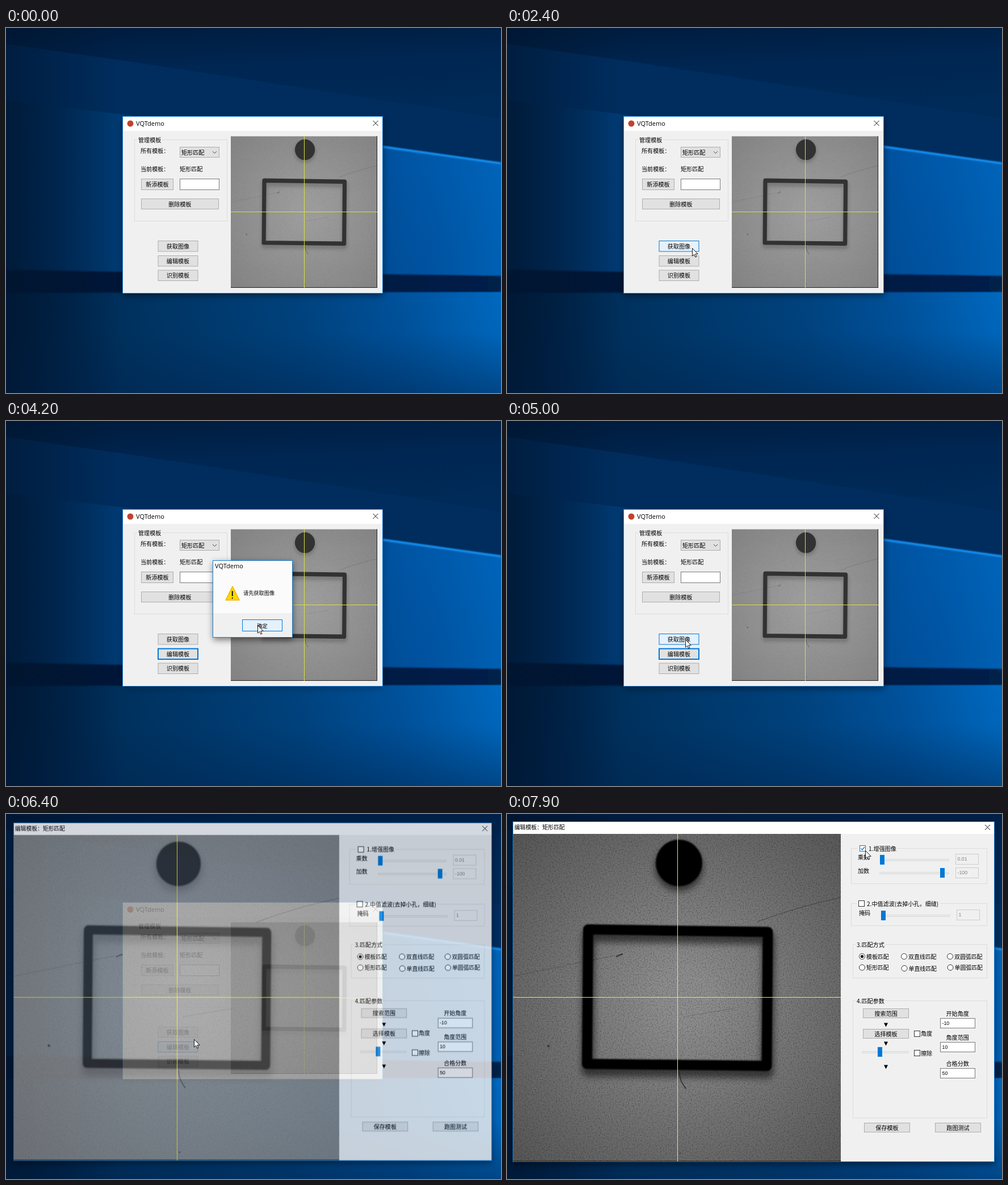
Recreate the animation shown at these times as an HTML page. Size 872 by 642 pixels, loop 8 s.

```html
<!DOCTYPE html>
<html lang="zh-CN">
<head>
<meta charset="utf-8">
<style>
html, body { margin: 0; width: 100%; height: 100%; overflow: hidden; background: #002a57; }
svg { display: block; width: 872px; height: 642px; }
text { font: 10.1px "Noto Sans CJK SC", "Noto Sans CJK", "Noto Sans", sans-serif; fill: #000; }
.latin { font: 11px "Open Sans", sans-serif; }
.num { font: 8.8px "Liberation Sans", sans-serif; }
.off { fill: #838383; }
.mid { text-anchor: middle; }
.btn rect { fill: #e1e1e1; stroke: #adadad; }
.btn.focus rect { stroke: #0078d7; stroke-width: 2; }
.btn.hover rect { fill: #e5f1fb; stroke: #0078d7; }
.btn.press rect { fill: #cce4f7; stroke: #005499; }
.group { fill: none; stroke: #dcdcdc; }
.edit { fill: #fff; stroke: #7a7a7a; }
.edit.dim { fill: #f0f0f0; stroke: #ccc; }
.box { fill: #fff; stroke: #333; }
.box.hover { stroke: #0078d7; }
.line { fill: none; stroke: #111; }
.cross { fill: none; stroke: #f0f01e; shape-rendering: crispEdges; }
</style>
</head>
<body>
<svg id="stage" viewBox="0 0 872 642"></svg>
<script>
const LOOP = 8000, STEP = 100;
const APP = 'VQTdemo';

const rect = (x, y, w, h, attrs = '') => `<rect x="${x}" y="${y}" width="${w}" height="${h}" ${attrs}/>`;
const text = (x, y, s, cls = '', attrs = '') => `<text x="${x}" y="${y}" class="${cls}" ${attrs}>${s}</text>`;
const path = (d, attrs) => `<path d="${d}" ${attrs}/>`;
const poly = (points, fill, attrs = '') => `<polygon points="${points}" fill="${fill}" ${attrs}/>`;

function gradient(id, x2, y2, ...stops) {
  const list = stops.map(([at, color, alpha = 1]) =>
    `<stop offset="${at}" stop-color="${color}" stop-opacity="${alpha}"/>`).join('');
  return `<linearGradient id="${id}" x1="0" y1="0" x2="${x2}" y2="${y2}">${list}</linearGradient>`;
}

function radial(id, inner, outer) {
  return `<radialGradient id="${id}" cx=".52" cy=".5" r=".75"><stop offset=".1" stop-color="${inner}"/>` +
    `<stop offset="1" stop-color="${outer}"/></radialGradient>`;
}

const blur = (id, size) => `<filter id="${id}" x="-30%" y="-30%" width="160%" height="160%">` +
  `<feGaussianBlur stdDeviation="${size}"/></filter>`;

const grain = (id, gain) => `<filter id="${id}" x="0" y="0" width="1" height="1">
  <feTurbulence type="fractalNoise" baseFrequency=".45" numOctaves="2" seed="4"/>
  <feColorMatrix values="0 0 0 0 0  0 0 0 0 0  0 0 0 0 0  ${gain} 0 0 0 ${-gain * .45}"/></filter>`;

const defs = `<defs>
  ${gradient('sky', 1, 0, [0, '#00203f'], [.45, '#00305f'], [1, '#003d7c'])}
  ${gradient('top', .25, 1, [0, '#001b3c'], [.5, '#002652'], [1, '#002a58'])}
  ${gradient('haze', 1, 0, [0, '#00264f'], [.22, '#003a72'], [1, '#00427f'])}
  ${gradient('beam', .25, 1, [0, '#0077d6'], [.18, '#005cae'], [1, '#00539f'])}
  ${gradient('beamSide', 1, 0, [0, '#00356e', .75], [.6, '#0052a2', .3], [1, '#0078d8', .35])}
  ${gradient('band', 1, 0, [0, '#001733'], [1, '#002049'])}
  ${gradient('floor', 1, 0, [0, '#001f42'], [.25, '#00325f'], [.6, '#00437f'], [.8, '#00529c'], [1, '#0069c0'])}
  ${gradient('floorFade', 0, 1, [0, '#00244e', 0], [.4, '#00244e', .05], [1, '#00244e', .5])}
  ${gradient('leftFade', 1, 0, [0, '#00152f', .65], [1, '#00152f', 0])}
  ${radial('plain', '#9e9e9e', '#838383')}
  ${radial('strong', '#8e8e8e', '#545454')}
  ${blur('soft', 1)}${blur('shade', 6)}${blur('drop', 6)}
  ${grain('fine', 1.1)}${grain('rough', 2.2)}
</defs>`;

const wallpaper =
  rect(0, 0, 872, 642, 'fill="url(#sky)"') +
  poly('0,0 872,0 872,160 390,85 225,60 0,28', 'url(#top)') +
  poly('0,28 225,60 390,85 872,160 872,440 0,440', '#002d5e') +
  poly('0,127 205,152 664,208 872,238 872,440 0,440', 'url(#haze)') +
  poly('560,190 664,207 872,237 872,440 560,440', 'url(#beam)') +
  poly('560,190 664,207 872,237 872,440 560,440', 'url(#beamSide)') +
  path('M664 209L872 238', 'stroke="#1c9bff" stroke-width="4" opacity=".75" filter="url(#soft)"') +
  rect(0, 464, 872, 178, 'fill="url(#floor)"') +
  rect(0, 464, 872, 178, 'fill="url(#floorFade)"') +
  poly('0,425 206,429 664,433 872,436 872,464 0,466', 'url(#band)', 'filter="url(#soft)"') +
  rect(0, 0, 200, 642, 'fill="url(#leftFade)"');

// Camera picture, drawn in the coordinates of the editor window.
function camera(enhanced) {
  const ink = enhanced ? '#000' : '#323232', fade = enhanced ? .55 : .25;
  const frame = attrs => path('M143 203L459.500 207.500 457.500 443 141 439.500Z',
    `fill="none" stroke="${ink}" stroke-linejoin="round" ${attrs}`);
  const scratch = (d, o, w = 1.2) => path(d, `fill="none" stroke="#222" stroke-width="${w}" opacity="${enhanced ? o * 1.7 : o}"`);
  return rect(11, 35, 577, 576, `fill="url(#${enhanced ? 'strong' : 'plain'})"`) +
    `<g filter="url(#shade)" opacity="${fade}">${frame('stroke-width="22" transform="translate(1 11)"')}
      <circle cx="303" cy="94" r="42" fill="${ink}"/></g>` +
    scratch('M440 190Q510 163 588 147', .28) + scratch('M11 285L190 249', .16) +
    scratch('M310 357L400 342', .14) + scratch('M192 251L204 246', .4, 2.5) +
    scratch('M303 452Q304 469 315 483', .5, 1.6) +
    `<g fill="#222" opacity=".5"><circle cx="73" cy="408" r="2.500"/><circle cx="305" cy="597" r="1.500"/></g>` +
    rect(11, 35, 577, 576, `filter="url(#${enhanced ? 'rough' : 'fine'})" opacity="${enhanced ? .32 : .2}"`) +
    `<g filter="url(#soft)">${frame(`stroke-width="${enhanced ? 18 : 16}"`)}
      <circle cx="303" cy="86" r="${enhanced ? 41 : 39.5}" fill="${ink}"/></g>`;
}

function button(id, x, y, w, h, label, attrs = '') {
  return `<g class="btn" id="${id}">${rect(x, y, w, h)}${text(x + w / 2, y + h / 2 + 4, label, 'mid', attrs)}</g>`;
}

function group(x, y, w, h, label, labelX, gapX, gapW) {
  return rect(x, y, w, h, 'class="group"') + rect(gapX, y - 6, gapW, 12, 'fill="#f0f0f0"') +
    text(labelX, y + 4.2, label);
}

const edit = (x, y, w, h, value = '', dim = false) =>
  rect(x, y, w, h, `class="edit${dim ? ' dim' : ''}"`) + text(x + 3, y + h / 2 + 2.6, value, dim ? 'num off' : 'num');

const check = (x, y, id = '') => rect(x, y, 10, 10, `class="box" id="${id}"`);

const radio = (x, y, label, on) => `<circle cx="${x}" cy="${y}" r="5" class="box"/>` +
  (on ? `<circle cx="${x}" cy="${y}" r="2.600"/>` : '') + text(x + 7.500, y + 4, label, '', 'style="font-size:9.900px"');

const slider = (x, y, w, thumb) => rect(x, y - 1.5, w, 3, 'fill="#e7eaea" stroke="#d6d6d6" stroke-width=".8"') +
  rect(thumb, y - 9, 8, 17, 'fill="#0078d7"');

const arrow = y => poly(`664,${y - 3} 671,${y - 3} 667.5,${y + 4}`, '#000');

const closeMark = (x, y) => path(`M${x - 4.5} ${y - 4.5}l9 9m0-9l-9 9`, 'class="line"');

const shadow = (x, y, w, h, id) => rect(x, y + 4, w, h, `fill="#000" opacity=".5" filter="url(#drop)" id="${id}"`);

const mainWindow = shadow(206, 156, 458, 310, 'mainShadow') +
  rect(205.5, 155.5, 458, 311, 'fill="#f0f0f0" stroke="#1883d7"') +
  rect(206, 156, 457, 25, 'fill="#fff"') +
  '<circle cx="219" cy="168" r="5.500" fill="#c0432f"/>' +
  text(229, 172, APP, 'latin') + closeMark(651, 167.5) +
  group(226.5, 196.5, 163, 143, '管理模板', 233, 231, 44) +
  text(237, 220, '所有模板：') +
  rect(306.5, 209.5, 69, 18, 'fill="#e1e1e1" stroke="#adadad"') + text(309, 222.5, '矩形匹配') +
  path('M364 217l3.500 3.500 3.500-3.500', 'class="line" style="stroke:#444"') +
  text(237, 251.5, '当前模板：') + text(306, 251.5, '矩形匹配') +
  button('add', 238.5, 265.5, 56, 19, '新添模板') + edit(306.5, 265.5, 69, 19) +
  button('remove', 238.5, 300.5, 136, 18, '删除模板') +
  button('grab', 268, 374.5, 70, 18.5, '获取图像') +
  button('modify', 268, 400.5, 70, 18.5, '编辑模板') +
  button('detect', 268, 426, 70, 18.5, '识别模板') +
  `<g transform="translate(396 190.500) scale(.4472 .4627) translate(-11 -35)">${camera(false)}</g>` +
  path('M396 456.500H654M653.500 190V457', 'stroke="#222" fill="none"') +
  path('M525.500 190V457M396 323.500H654', 'class="cross" style="stroke:#dce03c"');

const alertBox = `<g id="alert">${shadow(365, 245, 140, 136, 'alertShadow')}
  ${rect(364.5, 245.5, 140, 135, 'fill="#fbfbfb" stroke="#1883d7"')}
  ${rect(365, 338, 139, 42, 'fill="#f0f0f0"')}
  ${text(368, 259, APP, 'latin')}
  ${path('M399 291L411 315H387Z', 'fill="#ffd800" stroke="#f0b400" stroke-linejoin="round" stroke-width="1.500"')}
  ${path('M398.800 299V308M398.800 310.500V312.500', 'stroke="#111" stroke-width="2"')}
  ${text(418, 305.5, '请先获取图像', '', 'style="font-size:9.200px"')}
  ${button('ok', 416.5, 349.5, 70, 20, '确定', 'style="font-size:9.200px"')}</g>`;

const editor = `<g id="editor">${shadow(10, 13, 849, 599, 'editorShadow')}
  ${rect(10.5, 13.5, 848, 598, 'fill="#f0f0f0" stroke="#1883d7"')}
  ${rect(11, 14, 847, 21, 'fill="#fff"')}
  ${text(13, 27, '编辑模板：矩形匹配', '', 'style="font-size:9.850px"')}${closeMark(846.5, 23.5)}
  <g id="plainView">${camera(false)}</g><g id="strongView">${camera(true)}</g>
  ${path('M11 610.500H588', 'stroke="#222"')}
  ${path('M300.500 35V611M11 322.500H588', 'class="cross"')}
  ${group(606.5, 60.5, 239, 62, '1.增强图像', 637, 618, 69)}${check(621.5, 55.5, 'enhance')}
  <path id="tick" d="M623.500 60.500l2.300 2.500 4.200-5" class="line" style="stroke:#0078d7;stroke-width:1.300"/>
  ${text(618, 80, '乘数')}${slider(657, 81, 121, 657)}${edit(790.5, 70.5, 40, 18, '0.01', true)}
  ${text(618, 103.5, '加数')}${slider(657, 104, 121, 763)}${edit(790.5, 94.5, 40, 18, '-100', true)}
  ${group(606.5, 157.5, 239, 39, '2.中值滤波(去掉小孔，细缝)', 634, 616, 147)}${check(619.5, 152.5)}
  ${text(620, 178, '掩码')}${slider(659, 179, 121, 659)}${edit(792.5, 168.5, 40, 18, '1', true)}
  ${group(609.5, 229.5, 236, 59, '3.匹配方式', 616, 614, 51)}
  ${radio(625.5, 250.5, '模板匹配', true)}${radio(699.5, 250.5, '双直线匹配')}${radio(780.5, 250.5, '双圆弧匹配')}
  ${radio(625.5, 270, '矩形匹配')}${radio(700, 271.5, '单直线匹配')}${radio(781, 270, '单圆弧匹配')}
  ${group(609.5, 328.5, 236, 206, '4.匹配参数', 616, 614, 51)}
  ${button('area', 627.5, 342.5, 80, 16, '搜索范围')}${arrow(370.5)}
  ${button('pick', 627.5, 378.5, 80, 16, '选择模板')}${arrow(403.5)}
  ${slider(626, 419, 81, 653)}${arrow(444.5)}
  ${check(717.5, 381.5)}${text(729, 390, '角度')}${check(717.5, 415.5)}${text(729, 424.5, '擦除')}
  ${text(773.5, 354.5, '开始角度')}${edit(763.5, 359.5, 61, 17, '-10')}
  ${text(773.5, 397, '角度范围')}${edit(763.5, 401.5, 61, 17, '10')}
  ${text(773.5, 443, '合格分数')}${edit(763.5, 447.5, 61, 17, '50')}
  ${button('save', 629.5, 543.5, 80, 16, '保存模板')}${button('test', 754.5, 543.5, 80, 16, '跑图测试')}</g>`;

const pointer = `<path id="pointer" d="M0 0V13.600L3.200 10.700 5.200 15.500 7.400 14.600 5.400 9.900H9.700Z"
  fill="#fff" stroke="#000" stroke-width=".9"/>`;

document.getElementById('stage').innerHTML = defs + wallpaper + mainWindow + alertBox + editor + pointer;

const el = id => document.getElementById(id);
const show = (id, on) => el(id).setAttribute('display', on ? 'inline' : 'none');

// Pointer stops: time, x, y.
const route = [
  [100, 839, 37], [200, 839, 37], [1100, 272, 276], [2000, 310, 402], [2100, 320, 394], [2200, 320, 394],
  [2400, 326, 387], [2600, 320, 403], [2800, 320, 403], [3500, 443, 359], [4300, 443, 359],
  [4900, 314, 384], [5700, 312, 385], [6000, 315, 406], [6300, 315, 406], [6400, 331, 396],
  [7300, 622, 67], [7600, 625, 61], [7900, 631, 64]
];

function pointerAt(t) {
  const next = route.findIndex(stop => stop[0] > t);
  if (next < 1) return next < 0 ? route[route.length - 1].slice(1) : route[0].slice(1);
  const [t0, x0, y0] = route[next - 1], [t1, x1, y1] = route[next];
  const p = (t - t0) / (t1 - t0), e = p * p * (3 - 2 * p);
  return [x0 + (x1 - x0) * e, y0 + (y1 - y0) * e];
}

function inside(id, x, y) {
  const b = (el(id).querySelector('rect') || el(id)).getBBox();
  return x >= b.x && x <= b.x + b.width && y >= b.y && y <= b.y + b.height;
}

const between = (t, from, to) => t >= from && t < to;

function draw(t) {
  const [x, y] = pointerAt(t);
  const alertOpen = between(t, 2800, 4400), editorOpen = t >= 6200;
  const enhanced = t >= 7800;

  show('pointer', t >= 100);
  el('pointer').setAttribute('transform', `translate(${Math.round(x) + .5} ${Math.round(y) + .5})`);

  for (const id of ['add', 'remove', 'grab', 'modify', 'detect', 'ok']) {
    const live = id === 'ok' ? alertOpen : !alertOpen && !editorOpen && t >= 100;
    const pressed = id === 'modify' && (t === 2700 || t >= 6100) || id === 'grab' && between(t, 5100, 5300);
    const focused = id === 'ok' || id === 'modify' && between(t, 2800, 5100) || id === 'grab' && between(t, 5300, 6100);
    const state = pressed ? 'press' : live && inside(id, x, y) ? 'hover' : focused ? 'focus' : '';
    el(id).setAttribute('class', 'btn ' + state);
  }

  show('alert', alertOpen);
  el('alert').setAttribute('opacity', t < 2900 ? .45 : t < 3000 ? .85 : 1);
  el('mainShadow').setAttribute('opacity', alertOpen || editorOpen ? .25 : .5);

  const opening = t < 6400 ? [.4, .983] : t < 6500 ? [.83, .993] : [1, 1];
  show('editor', editorOpen);
  el('editor').setAttribute('opacity', opening[0]);
  el('editor').setAttribute('transform',
    `translate(434.5 312.5) scale(${opening[1]}) translate(-434.5 -312.5)`);
  show('plainView', !enhanced);
  show('strongView', enhanced);
  show('tick', enhanced);
  el('enhance').setAttribute('class', inside('enhance', x, y) || enhanced ? 'box hover' : 'box');
}

let last = -1;
function tick() {
  const t = Math.floor(performance.now() % LOOP / STEP) * STEP;
  if (t !== last) draw(last = t);
  requestAnimationFrame(tick);
}
tick();
</script>
</body>
</html>
```
